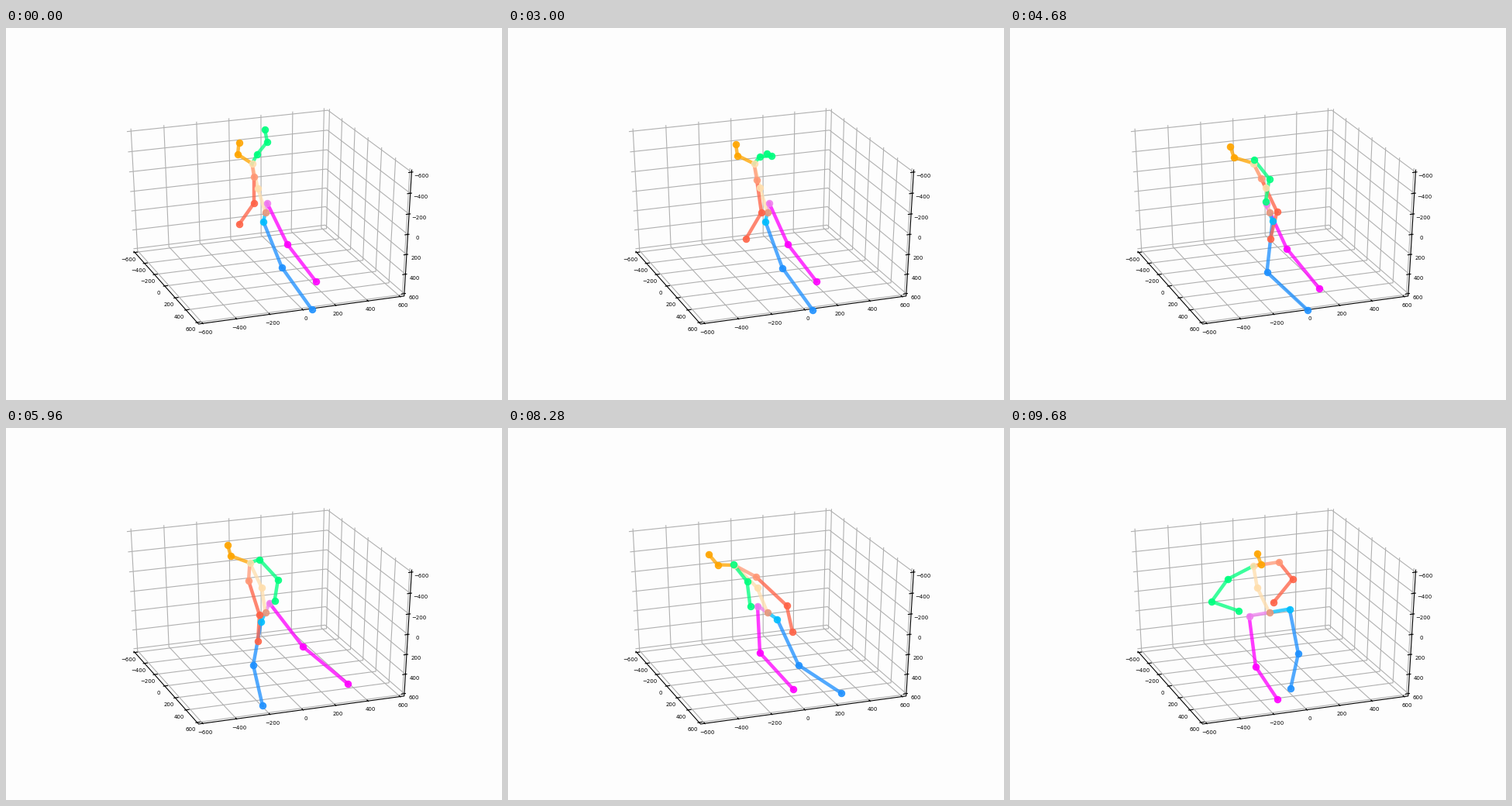
A matplotlib script for the animation above (9720 ms loop, 640 by 480 pixels).

```python
import numpy as np
import matplotlib.pyplot as plt
from matplotlib.animation import FuncAnimation
from matplotlib.collections import LineCollection

W, H, DPI = 640, 480, 100
FRAMES, STEP = 243, 40
CENTER = np.array([334.6, 238.0])
SCALE = np.array([268.1, 177.6])
ELEV, AZIM, DIST = np.radians(30), np.radians(-20), 10
LIM, PAD, TICK = 625, 41, 10
TICKS = range(-600, 601, 200)

fig = plt.figure(figsize=(W / DPI, H / DPI), dpi=DPI, facecolor="#fdfdfd")
ax = fig.add_axes([0, 0, 1, 1])
ax.set_xlim(0, W)
ax.set_ylim(H, 0)
ax.axis("off")


def project(x, y, z):
    """Perspective view of the room; z grows downwards."""
    x, y, z = x / 1200, y / 1200, -z / 1200
    ca, sa, ce, se = np.cos(AZIM), np.sin(AZIM), np.cos(ELEV), np.sin(ELEV)
    right = -sa * x + ca * y
    up = -se * (ca * x + sa * y) + ce * z
    depth = ce * (ca * x + sa * y) + se * z
    return CENTER + SCALE * np.array([right, -up]) * DIST / (DIST - depth)


def strokes(paths, color, order):
    lines = [[project(*p) for p in path] for path in paths]
    ax.add_collection(LineCollection(lines, colors=color, linewidths=0.8,
                                     zorder=order), autolim=False)


def draw_room():
    grid, ticks = [], []
    far, near = LIM + TICK, LIM - 2 * TICK
    for v in TICKS:
        grid += [
            [(v, -LIM, LIM), (v, LIM, LIM), (v, LIM, -LIM)],
            [(LIM, v, LIM), (-LIM, v, LIM), (-LIM, v, -LIM)],
            [(-LIM, -LIM, v), (-LIM, LIM, v), (LIM, LIM, v)],
        ]
        ticks += [
            [(v, -near, LIM), (v, -far, LIM)],
            [(near, v, LIM), (far, v, LIM)],
            [(LIM, near, v), (LIM, far, v)],
        ]
        out = LIM + PAD
        for spot in [(v, -out, out), (out, v, out), (out, out, v)]:
            ax.text(*project(*spot), str(v).replace("-", "\u2212"),
                    fontsize=5, ha="center", va="top")
    edges = [[(-LIM, -LIM, LIM), (LIM, -LIM, LIM), (LIM, LIM, LIM),
              (LIM, LIM, -LIM)]]
    strokes(grid, "#b0b0b0", 1)
    strokes(ticks + edges, "black", 2)


def smooth(t, v, q):
    """Monotone cubic through the keys (t, v), sampled at q."""
    h, d = np.diff(t), np.diff(v) / np.diff(t)
    m = np.zeros(len(t))
    m[0], m[-1] = d[0], d[-1]
    for i in range(1, len(t) - 1):
        if d[i - 1] * d[i] > 0:
            a, b = 2 * h[i] + h[i - 1], h[i] + 2 * h[i - 1]
            m[i] = (a + b) / (a / d[i - 1] + b / d[i])
    k = np.clip(np.searchsorted(t, q, "right") - 1, 0, len(h) - 1)
    s = (q - t[k]) / h[k]
    return ((1 + 2 * s) * (1 - s) ** 2 * v[k] + s * (1 - s) ** 2 * h[k] * m[k]
            + s * s * (3 - 2 * s) * v[k + 1] + s * s * (s - 1) * h[k] * m[k + 1])


KEY_TIMES = (0, 3, 4.68, 5.96, 7.08, 8.28, 9.68)
CLOCK = np.arange(FRAMES) * STEP / 1000


def track(*points, extra=()):
    """Joint path over the loop; extra holds (time, point) keys."""
    keys = sorted(list(zip(KEY_TIMES, points)) + list(extra))
    t = np.array([k[0] for k in keys], float)
    p = np.array([k[1] for k in keys], float)
    return np.column_stack([smooth(t, p[:, i], CLOCK) for i in (0, 1)])


root = np.tile(CENTER, (FRAMES, 1))

# trunk and head
spine = track((325, 207), (325, 206), (330, 206), (330, 206),
              (325, 208), (321.5, 206), (319, 206))
neck = track((317.5, 175), (317.5, 175), (314, 174.5), (314.5, 174),
             (302.5, 179), (292, 177), (314, 178))
nose = track((299, 163), (296, 164.5), (289, 167), (290, 165),
             (277, 172), (270.5, 176.5), (324, 176))
head = track((300.5, 148), (294, 150), (284, 152.5), (286, 151),
             (266, 159), (259, 163), (319, 162), extra=[(5.05, (281, 152))])

# legs
hip_a = track((337, 226), (337, 226), (330.5, 227), (340, 226),
              (345.5, 225.5), (322, 229.5), (308.5, 242.5))
knee_a = track((363, 279), (361, 279), (357, 284.5), (383, 282),
               (343.5, 274), (325, 290), (317, 308),
               extra=[(6.3, (387, 280))])
foot_a = track((399.5, 326.5), (398, 327), (399, 336), (441, 330),
               (391.5, 325.5), (368, 337), (345, 350),
               extra=[(5.0, (403, 336)), (6.32, (457, 328))])
hip_b = 2 * root - hip_a
knee_b = track((356, 309), (354, 309.5), (331.5, 315), (319, 306),
               (351, 303.5), (375, 306), (372, 291))
foot_b = track((394.5, 363), (393, 363.5), (384, 364), (331, 358),
               (395, 352), (430, 342), (362, 336),
               extra=[(4.0, (391, 369)), (8.02, (437.5, 344)),
                      (9.0, (393, 341))])

# arms
shoulder_a = track((324, 163), (325, 166), (315, 170), (327, 169.5),
                   (324.5, 170.5), (290.5, 175.5), (281, 195))
elbow_a = track((337, 147), (340, 165), (334.5, 194.5), (351, 195.5),
                (357, 192), (308.5, 198), (260, 224),
                extra=[(2.1, (337, 148))])
wrist_a = track((334, 131), (333.5, 161.5), (330, 223.5), (346.5, 223),
                (350.5, 217), (312.5, 230), (295, 236),
                extra=[(2.1, (334, 132))])
shoulder_b = track((320, 192), (321, 196), (324, 194), (313, 197),
                   (294, 204), (320, 192), (347, 173))
elbow_b = track((320, 226), (327, 238), (344.5, 237), (327, 241),
                (298, 245), (359.5, 229), (364.5, 195))
wrist_b = track((301, 253), (307, 272), (336, 272), (325, 275),
                (286, 265), (367, 263), (340, 225))

BONES = [
    (root, hip_a, "violet"), (hip_a, knee_a, "magenta"),
    (knee_a, foot_a, "magenta"),
    (root, hip_b, "deepskyblue"), (hip_b, knee_b, "dodgerblue"),
    (knee_b, foot_b, "dodgerblue"),
    (root, spine, "navajowhite"), (spine, neck, "navajowhite"),
    (neck, nose, "orange"), (nose, head, "orange"),
    (neck, shoulder_b, "#ff9a78"), (shoulder_b, elbow_b, "tomato"),
    (elbow_b, wrist_b, "tomato"),
    (neck, shoulder_a, "springgreen"), (shoulder_a, elbow_a, "springgreen"),
    (elbow_a, wrist_a, "springgreen"),
]
JOINTS = [(root, "darksalmon")] + [(end, color) for _, end, color in BONES]

draw_room()
bones = [ax.plot([], [], color=c, lw=3.2, alpha=0.77, zorder=4)[0]
         for _, _, c in BONES]
dots = [ax.plot([], [], "o", color=c, ms=6, mew=0.8, alpha=0.88, zorder=5)[0]
        for _, c in JOINTS]


def update(i):
    for line, (a, b, _) in zip(bones, BONES):
        line.set_data([a[i, 0], b[i, 0]], [a[i, 1], b[i, 1]])
    for dot, (p, _) in zip(dots, JOINTS):
        dot.set_data([p[i, 0]], [p[i, 1]])
    return bones + dots


anim = FuncAnimation(fig, update, frames=FRAMES, interval=STEP, repeat=True,
                     repeat_delay=0, blit=False)
plt.show()
```
